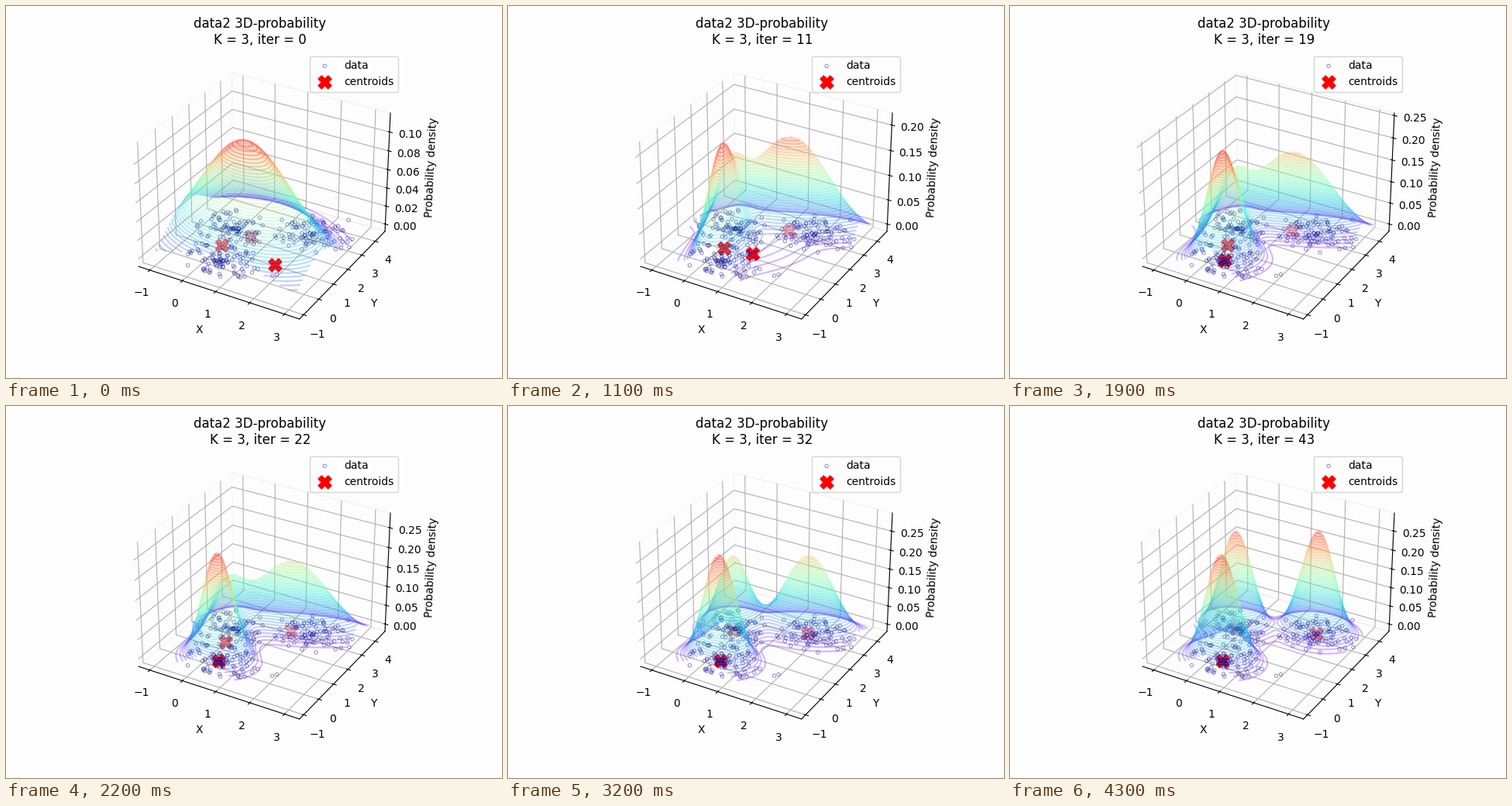
Write a matplotlib script that moves like this. It is 640x480 px and loops after 4400 ms.

```python
import numpy as np
import matplotlib.pyplot as plt
from matplotlib.animation import FuncAnimation

FRAMES, INTERVAL = 44, 100
BG = "#fdfdfd"
X_RANGE = (-1.045, 3.12)
Y_RANGE = (-0.88, 4.36)
PAD = 0.05 + 1.1 / 48  # autoscale margin plus the 3D view margin

# Three phases of the fit: unit Gaussians, a plateau of stretched ones, one per blob
START = np.array([(0.19, 0.81), (1.87, 0.65), (0.65, 1.76)])
PLATEAU = np.array([  # mean x, mean y, var x, cov xy, var y
    (0.27, 0.66, 0.155, -0.19, 0.95),
    (1.25, 1.15, 0.80, 0.70, 2.00),
    (1.32, 2.70, 0.95, 0.42, 0.36),
])
BLOBS = np.array([(0.0, 1.91), (0.51, -0.05), (1.98, 2.94)])
BLOB_VAR = np.array([0.19, 0.19, 0.21])
LEAVE = [(13, 37), (6, 21), (16, 40)]  # when each component goes from plateau to blob

plt.rcParams.update({"figure.facecolor": BG, "axes.facecolor": BG})


def make_data():
    rng = np.random.default_rng(7)
    parts = [[(2.12, 0.20), (2.05, 0.06), (-0.44, 3.02), (2.47, 4.35), (X_RANGE[1], 2.82)]]
    for center in BLOBS:
        r = 1.15 * rng.random(100)
        a = 2 * np.pi * rng.random(100)
        p = center + np.column_stack([r * np.cos(a), r * np.sin(a)])
        parts.append(p[(p[:, 0] > X_RANGE[0]) & (p[:, 1] > Y_RANGE[0])])
    return np.vstack(parts)


DATA = make_data()
GX, GY = np.meshgrid(np.linspace(*X_RANGE, 100), np.linspace(*Y_RANGE, 100))


def padded(lo, hi):
    d = (hi - lo) * PAD
    return lo - d, hi + d


def smooth(t, t0, t1):
    u = np.clip((t - t0) / (t1 - t0), 0, 1)
    return u * u * (3 - 2 * u)


def mix(a, b, f):
    return a + (b - a) * f


def state_at(i):
    """Weights and Gaussian parameters at iteration i."""
    settle = 1 - (1 - min(i / 6, 1)) ** 3
    first = np.column_stack([START, [1] * 3, [0] * 3, [1] * 3])
    last = np.column_stack([BLOBS, BLOB_VAR, [0] * 3, BLOB_VAR])
    leave = np.array([smooth(i, *w) for w in LEAVE])
    params = mix(mix(first, PLATEAU, settle), last, leave[:, None])
    w2 = mix(mix(1 / 3, 0.12, settle), 0.33, smooth(i, 10, 32))
    w3 = mix(mix(1 / 3, 0.47, settle), 0.36, leave[2])
    return (1 - w2 - w3, w2, w3), params


def density(weights, params):
    z = np.zeros_like(GX)
    for w, (mx, my, vx, cxy, vy) in zip(weights, params):
        dx, dy = GX - mx, GY - my
        det = vx * vy - cxy ** 2
        q = (vy * dx ** 2 - 2 * cxy * dx * dy + vx * dy ** 2) / det
        z += w / (2 * np.pi * np.sqrt(det)) * np.exp(-q / 2)
    return z


fig = plt.figure(figsize=(6.4, 4.8), dpi=100)
ax = fig.add_subplot(projection="3d", computed_zorder=False)


def draw(i):
    ax.clear()
    weights, params = state_at(i)
    z = density(weights, params)
    ax.scatter(DATA[:, 0], DATA[:, 1], 0, s=10, facecolors="none", edgecolors="darkblue",
               linewidths=0.8, alpha=0.4, label="data", zorder=3)
    ax.scatter(params[:, 0], params[:, 1], 0, s=150, c="red", marker="X",
               label="centroids", zorder=2)
    ax.contour3D(GX, GY, z, 50, cmap="rainbow", alpha=0.3, zorder=4)
    ax.set_xlim(*padded(*X_RANGE))
    ax.set_ylim(*padded(*Y_RANGE))
    ax.set_zlim(*padded(0, z.max()))
    for axis in (ax.xaxis, ax.yaxis, ax.zaxis):
        axis.pane.set_facecolor("none")
    ax.set_xlabel("X")
    ax.set_ylabel("Y")
    ax.set_zlabel("Probability density")
    ax.set_title(f"data2 3D-probability\nK = 3, iter = {i}")
    ax.legend(loc="upper right")


anim = FuncAnimation(fig, draw, frames=FRAMES, init_func=lambda: draw(0),
                     interval=INTERVAL, repeat=True, repeat_delay=0)
plt.show()
```
